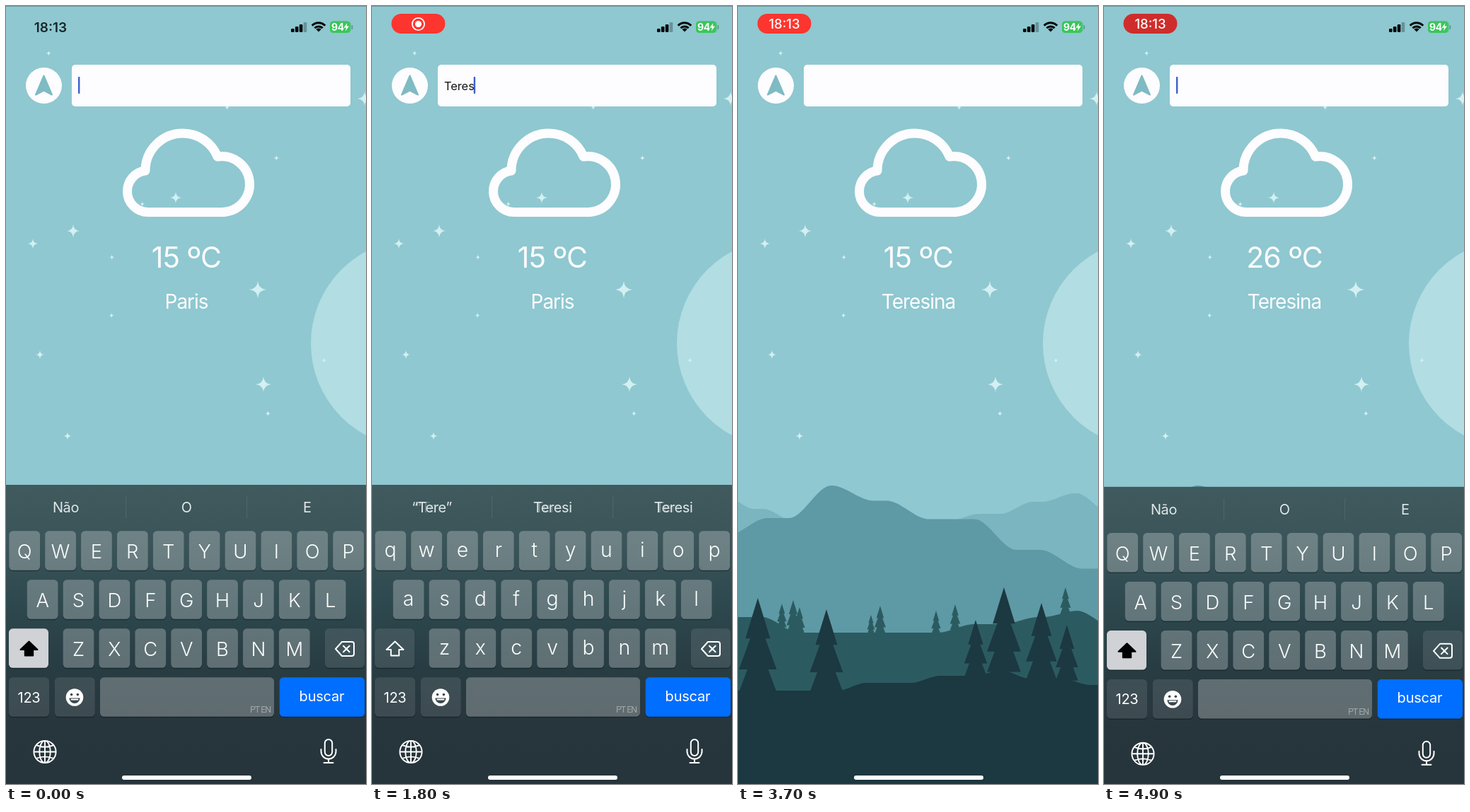
An HTML page with a canvas that plays this animation: 509x1100 px, repeating every 5000 ms.

```html
<!DOCTYPE html>
<html lang="pt">
<head>
<meta charset="utf-8">
<title>Weather search</title>
<style>
html, body { margin: 0; width: 100%; height: 100%; overflow: hidden; background: #8fc8d0; }
canvas { display: block; width: 100vw; height: 100vh; }
</style>
</head>
<body>
<canvas id="stage"></canvas>
<script>
const W = 509, H = 1100, LOOP = 5000, STEP = 100;
const FONT = 'Inter, Roboto, sans-serif';
const WHITE = '#fdfcff', INK = '#06090a';
const PI = Math.PI, TAU = 2 * PI;
const CITY = 'Teresina', SENT = 3139, REOPEN = 4494;
const canvas = document.getElementById('stage');
const c = canvas.getContext('2d');
const ratio = window.devicePixelRatio || 1;
canvas.width = W * ratio;
canvas.height = H * ratio;

const clamp = v => Math.max(0, Math.min(1, v));
const smooth = v => { v = clamp(v); return v * v * (3 - 2 * v); };

// Critically damped spring: 1 at the start, 0 when settled.
function spring(ms) {
  const x = Math.max(0, ms) * 0.0175;
  return (1 + x) * Math.exp(-x);
}

function random(seed) {
  return () => (seed = seed * 16807 % 2147483647) / 2147483647;
}

function box(x, y, w, h, r, fill) {
  c.beginPath();
  c.roundRect(x, y, w, h, r);
  c.fillStyle = fill;
  c.fill();
}

function disc(x, y, r, fill) {
  c.beginPath();
  c.arc(x, y, r, 0, TAU);
  c.fillStyle = fill;
  c.fill();
}

function text(str, x, y, size, fill, { weight = 400, gap = 0, align = 'center', font = FONT } = {}) {
  c.font = `${weight} ${size}px ${font}`;
  c.letterSpacing = gap + 'px';
  c.textAlign = align;
  c.fillStyle = fill;
  c.fillText(str, x, y);
  return c.measureText(str).width;
}

function poly(points, fill) {
  c.beginPath();
  points.forEach(p => c.lineTo(...p));
  c.closePath();
  c.fillStyle = fill;
  c.fill();
}

// Right half of an outline, mirrored about x.
const mirror = (x, half) => [
  ...half.map(([dx, y]) => [x + dx, y]),
  ...half.map(([dx, y]) => [x - dx, y]).reverse()
];

function line(width, color, draw) {
  c.lineWidth = width;
  c.strokeStyle = color;
  c.lineCap = c.lineJoin = 'round';
  c.beginPath();
  draw();
  c.stroke();
}

/* ---------- scenery ---------- */

// A ridge is a level line plus smooth steps [centre, rise].
const ridge = (level, width, steps) => x =>
  steps.reduce((y, [mid, dy]) => y + dy * smooth((x - mid) / width + 0.5), level);

const back = ridge(690, 46, [[0, 21], [58, 18], [318, -11], [394, -17], [453, -12], [502, 27]]);
const middle = ridge(750, 60, [[12, -26], [102, -46], [162, 21.5], [240, 26], [364, 43.5], [457, 26.5]]);
const hill = ridge(864, 52, [[60, 22], [308, -12], [399, -10], [456, -9], [505, 23]]);
const front = ridge(968, 42, [[161, -11], [265, -10], [354, -8], [392, 12], [478, 9]]);
const FAR_TREES = [[62, 845], [78, 840], [87, 850], [188, 861], [201, 848], [280, 855], [307, 846], [463, 822]];
const NEAR_TREES = [[28, 837], [125, 853], [336, 868], [376, 822], [429, 844], [465, 875]];
const BIG_STARS = [[356, 401], [364, 535], [507, 131], [95, 318], [240, 271], [38, 336], [48, 493], [87, 608]];

function land(height, fill) {
  const points = [[W, H], [0, H]];
  for (let x = 0; x <= W + 1; x += 2) points.push([x, height(x)]);
  poly(points, fill);
}

function trees(list, height, fill) {
  for (const [x, top] of list) {
    const size = height(x) + 2 - top, half = size * 0.2;
    const side = [[0, top]];
    for (let i = 1; i <= 3; i++) {
      const y = top + size * (0.1 + 0.33 * i - (i > 2 ? 0.09 : 0));
      side.push([half * Math.min(1, 0.3 + 0.36 * i), y]);
      if (i < 3) side.push([half * (0.25 + 0.15 * i), y]);
    }
    poly(mirror(x, side), fill);
  }
}

function star(x, y, r) {
  c.beginPath();
  c.moveTo(x, y - r);
  for (let i = 0; i < 4; i++) {
    const a = i * PI / 2, m = a - PI / 4, k = r * 0.12;
    c.quadraticCurveTo(x + k * Math.cos(m), y + k * Math.sin(m), x + r * Math.cos(a), y + r * Math.sin(a));
  }
  c.fillStyle = '#d3eff2';
  c.fill();
}

function scenery() {
  c.fillStyle = '#8fc8d0';
  c.fillRect(0, 0, W, H);
  disc(578.3, 477, 147.3, '#b1dde3');
  BIG_STARS.forEach(([x, y], i) => star(x, y, Math.max(5.5, 12 - i)));
  const next = random(71);
  for (let i = 0; i < 8; i++) star(60 + 390 * next(), 60 + i * 72 + 20 * next(), 3.8);
  land(back, '#7bb5c0');
  land(middle, '#5e9aa5');
  trees(FAR_TREES, hill, '#2b5b60');
  land(hill, '#2b5b60');
  trees(NEAR_TREES, front, '#1c3840');
  land(front, '#1c3840');
  c.fillStyle = '#6f989e';
  c.fillRect(0, 0, W, 1);
}

/* ---------- weather and search ---------- */

const pressTime = i => 1020 + 180 * i;

function typedCount(t) {
  if (t >= REOPEN) return 0;
  return Math.round(clamp(Math.floor((t - pressTime(0)) / 180 + 1) / CITY.length) * CITY.length);
}

function weather(t) {
  line(13, WHITE, () => {
    c.arc(201, 262, 29.5, PI / 2, Math.atan2(-29, -4));
    c.arc(250, 233, 53, PI, Math.atan2(-20, 49));
    c.arc(305, 252, 39.5, Math.atan2(-39, -6), PI / 2);
    c.closePath();
  });
  text(t < 3900 ? '15 ºC' : '26 ºC', 255, 370, 41, WHITE, { gap: -0.8 });
  text(t < SENT ? 'Paris' : CITY, 255, 428, 28, WHITE, { gap: -1 });
}

function search(t) {
  const arrow = mirror(53.5, [[0, 98.5], [11.5, 125.5], [0, 119.5]]);
  disc(53.5, 112.5, 25.5, WHITE);
  poly(arrow, '#7fbbc3');
  line(2, '#7fbbc3', () => { arrow.forEach(p => c.lineTo(...p)); c.closePath(); });
  box(93, 83, 394, 59, 5, WHITE);
  const typed = t < SENT ? CITY.slice(0, typedCount(t)) : '';
  const width = text(typed, 102, 119, 16.5, '#15161a', { gap: -0.1, align: 'left' });
  if (t < SENT || t >= REOPEN) box(102 + Math.max(0, width - 1), 100, 2.4, 24, 1, '#3c5fd0');
}

/* ---------- status bar ---------- */

function pill(t) {
  const shown = clamp((t - 200) / 200), timeIn = clamp((t - 3100) / 200);
  const glow = clamp(0.625 * (1 - Math.cos((t - 1150) / 1900 * TAU)));
  if (shown < 1) text('18:13', 63, 37, 19, '#17282c', { weight: 600 });
  c.globalAlpha = shown;
  box(27.5, 11, 76, 28, 14, `rgb(${207 + 48 * glow},${45 + 8 * glow},${43 + 4 * glow})`);
  c.globalAlpha = shown * (1 - timeIn);
  line(1.8, '#fff', () => c.arc(65.5, 25.5, 8.6, 0, TAU));
  disc(65.5, 25.5, 4.6, '#fff');
  c.globalAlpha = timeIn;
  text('18:13', 65.5, 32, 18.5, '#fff', { weight: 500 });
  c.globalAlpha = 1;
}

function status(t) {
  pill(t);
  for (let i = 0; i < 4; i++) {
    const h = 5 + 3 * i;
    box(403 + i * 5.9, 37 - h, 4.6, h, 1.2, i < 3 ? INK : 'rgba(20,50,55,.35)');
  }
  for (let i = 0; i < 3; i++) {
    c.beginPath();
    c.arc(442, 36.5, 2.5 + i * 5.1, -PI * 0.76, -PI * 0.24);
    c.lineWidth = i ? 3 : 5;
    c.lineCap = 'butt';
    c.strokeStyle = INK;
    c.stroke();
  }
  box(458, 21.5, 30, 16.5, 5, 'rgba(60,190,100,.55)');
  box(458, 21.5, 28.5, 16.5, 4.5, '#3ac65c');
  box(488.6, 27, 1.6, 6, 1, 'rgba(30,70,70,.45)');
  text('94', 469, 35, 14, '#fff', { weight: 700, gap: -0.4 });
  poly([[482.5, 24], [477.5, 30.8], [481, 30.8], [479.8, 35.5], [485, 28.6], [481.6, 28.6]], '#fff');
}

/* ---------- keyboard ---------- */

const KB_TOP = 677, KB_HEIGHT = H - KB_TOP;
const ROWS = ['qwertyuiop', 'asdfghjkl', 'zxcvbnm'];
const PITCH = 50.88, KEY_W = 43.8, KEY_H = 55.5;
const LIGHT = 'rgba(255,255,255,.26)', DARK = 'rgba(255,255,255,.1)';
const rowY = i => 742.3 + 69 * i;
let panel;

function hints(n) {
  if (!n) return ['Não', 'O', 'E'];
  const quoted = `“${CITY.slice(0, n)}”`;
  if (n === CITY.length) return [quoted, '', ''];
  return [quoted, CITY.slice(0, n + 2), 'Teresinha'.slice(0, n + 2)];
}

function hintBar(t) {
  const reopened = t >= REOPEN, lag = t - 100;
  const n = typedCount(reopened ? t : lag);
  const since = reopened ? t - REOPEN : lag - pressTime(n - 1);
  const p = n || reopened ? clamp(since / 200) : 1;
  const before = hints(reopened ? CITY.length : Math.max(0, n - 1));
  hints(n).forEach((now, i) => {
    const x = 84.5 + i * 170.7, old = before[i];
    if (p < 1) {
      // The old words dissolve from right to left.
      c.font = `400 20px ${FONT}`;
      const w = c.measureText(old).width;
      const fade = c.createLinearGradient(x - w / 2, 0, x + w * (0.9 - p) + 4, 0);
      fade.addColorStop(0, 'rgba(226,232,233,.5)');
      fade.addColorStop(1, 'rgba(226,232,233,0)');
      text(old, x, 716, 20, fade, { gap: -0.4 });
    }
    c.globalAlpha = old ? clamp(p * 2) : 1;
    text(now, x, 716, 20, '#e0e7e8', { gap: -0.4 });
    c.globalAlpha = 1;
  });
}

function key(x, row, w, fill) {
  const y = rowY(row);
  box(x, y + 1.5, w, KEY_H, 5.5, 'rgba(10,22,26,.45)');
  box(x, y, w, KEY_H, 5.5, panel);
  box(x, y, w, KEY_H, 5.5, fill);
}

const rowX = chars => (W - chars.length * PITCH) / 2 + 4.2;

function letters(upper) {
  ROWS.forEach((chars, row) => [...chars].forEach((ch, i) => {
    const x = rowX(chars) + i * PITCH;
    key(x, row, KEY_W, LIGHT);
    text(upper ? ch.toUpperCase() : ch, x + KEY_W / 2, rowY(row) + (upper ? 38.5 : 36.5),
      upper ? 27.5 : 28.5, '#fafcfc', { weight: 350 });
  }));
}

function shiftKey(upper) {
  key(4, 2, 56, upper ? '#d0d2d5' : DARK);
  const arrow = mirror(32.5, [[0, 898.5], [12, 910], [5.7, 910], [5.7, 918.5]]);
  poly(arrow, upper ? '#000' : 'transparent');
  line(2, upper ? '#000' : '#fff', () => { arrow.forEach(p => c.lineTo(...p)); c.closePath(); });
}

function deleteKey() {
  key(451, 2, 56, DARK);
  line(2, '#fff', () => {
    c.moveTo(466, 909);
    c.lineTo(475, 899);
    c.arcTo(492, 899, 492, 909, 3);
    c.arcTo(492, 919, 475, 919, 3);
    c.lineTo(475, 919);
    c.closePath();
    for (const s of [-1, 1]) {
      c.moveTo(477, 909 - 4.3 * s);
      c.lineTo(485.6, 909 + 4.3 * s);
    }
  });
}

function bottomRow() {
  key(4, 3, 57, DARK);
  text('123', 32.5, 984.5, 20, '#fff', { gap: -0.3 });
  key(68.8, 3, 57, DARK);
  disc(97, 977.5, 12.3, '#fff');
  for (const s of [-1, 1]) disc(97 + 4.4 * s, 973.5, 1.8, '#3a474c');
  c.beginPath();
  c.arc(97, 978.5, 7.6, 0, PI);
  c.fill();
  box(91.5, 979.5, 11, 2, 1, '#fff');
  key(133, 3, 246, LIGHT);
  text('PT EN', 374, 999, 12.5, 'rgba(235,240,242,.45)', { gap: -1.1, align: 'right', font: 'Roboto, sans-serif' });
  key(386.7, 3, 120.5, '#006eff');
  text('buscar', 446.5, 982.5, 20, '#fff', { gap: -0.2 });
}

function globe(x, y, r) {
  line(1.9, '#fff', () => {
    c.arc(x, y, r, 0, TAU);
    c.moveTo(x + r / 2, y);
    c.ellipse(x, y, r / 2, r, 0, 0, TAU);
    c.moveTo(x, y - r); c.lineTo(x, y + r);
    c.moveTo(x - r, y); c.lineTo(x + r, y);
    for (const s of [-1, 1]) {
      c.moveTo(x - r * 0.78, y + s * r * 0.6);
      c.quadraticCurveTo(x, y + s * r * 0.28, x + r * 0.78, y + s * r * 0.6);
    }
  });
}

function microphone(x, y) {
  line(2, '#fff', () => {
    c.roundRect(x - 5.2, y - 16, 10.4, 23, 5.2);
    c.moveTo(x - 10.5, y - 2);
    c.lineTo(x - 10.5, y + 1);
    c.arc(x, y + 1, 10.5, PI, 0, true);
    c.lineTo(x + 10.5, y - 2);
    c.moveTo(x, y + 12); c.lineTo(x, y + 17);
    c.moveTo(x - 6.5, y + 17); c.lineTo(x + 6.5, y + 17);
  });
}

function popup(ch) {
  const row = ROWS.findIndex(r => r.includes(ch.toLowerCase()));
  const mid = rowX(ROWS[row]) + ROWS[row].indexOf(ch.toLowerCase()) * PITCH + KEY_W / 2;
  const y = rowY(row), top = y - 76, foot = y + KEY_H;
  const head = 37.5, neck = KEY_W / 2;
  c.save();
  c.shadowColor = 'rgba(0,0,0,.35)';
  c.shadowBlur = 8;
  c.beginPath();
  c.moveTo(mid, top);
  c.arcTo(mid + head, top, mid + head, y - 22, 12);
  c.lineTo(mid + head, y - 22);
  c.bezierCurveTo(mid + head, y - 8, mid + neck, y - 12, mid + neck, y + 6);
  c.arcTo(mid + neck, foot, mid, foot, 5.5);
  c.arcTo(mid - neck, foot, mid - neck, y, 5.5);
  c.lineTo(mid - neck, y + 6);
  c.bezierCurveTo(mid - neck, y - 12, mid - head, y - 8, mid - head, y - 22);
  c.arcTo(mid - head, top, mid, top, 12);
  c.closePath();
  c.fillStyle = '#6b7d81';
  c.fill();
  c.restore();
  text(ch, mid, y - 28.5, 39, '#fff', { weight: 350 });
}

function keyboard(t) {
  const drop = KB_HEIGHT * (t < REOPEN ? 1 - spring(t - SENT) : spring(t - REOPEN));
  if (drop > KB_HEIGHT - 1) return;
  const upper = t < pressTime(0) || t >= REOPEN;
  c.save();
  c.translate(0, drop);
  // The blurred backdrop stays fixed to the screen.
  panel = c.createLinearGradient(0, KB_TOP - drop, 0, H - drop);
  ['#405a5e', '#3a5459', '#2d484e', '#283d43', '#27363c', '#26343b']
    .forEach((color, i, all) => panel.addColorStop(i / (all.length - 1), color));
  c.fillStyle = panel;
  c.fillRect(0, KB_TOP, W, KB_HEIGHT);
  c.fillStyle = 'rgba(255,255,255,.08)';
  for (const x of [169, 340]) c.fillRect(x, 693, 1.2, 31);
  hintBar(t);
  letters(upper);
  shiftKey(upper);
  deleteKey();
  bottomRow();
  globe(55, 1054.5, 15.6);
  microphone(456, 1053);
  const pressed = [...CITY].findLast((_, i) => t >= pressTime(i) - 100 && t < pressTime(i) + 50);
  if (pressed) popup(pressed);
  c.restore();
}

function draw(now) {
  const t = Math.floor(now % LOOP / STEP) * STEP;
  c.setTransform(ratio, 0, 0, ratio, 0, 0);
  scenery();
  weather(t);
  search(t);
  status(t);
  keyboard(t);
  box(164, 1088, 183, 6, 3, '#fff');
}

let start;
function frame(now) {
  start ??= now;
  draw(now - start);
  requestAnimationFrame(frame);
}
requestAnimationFrame(frame);
</script>
</body>
</html>
```
